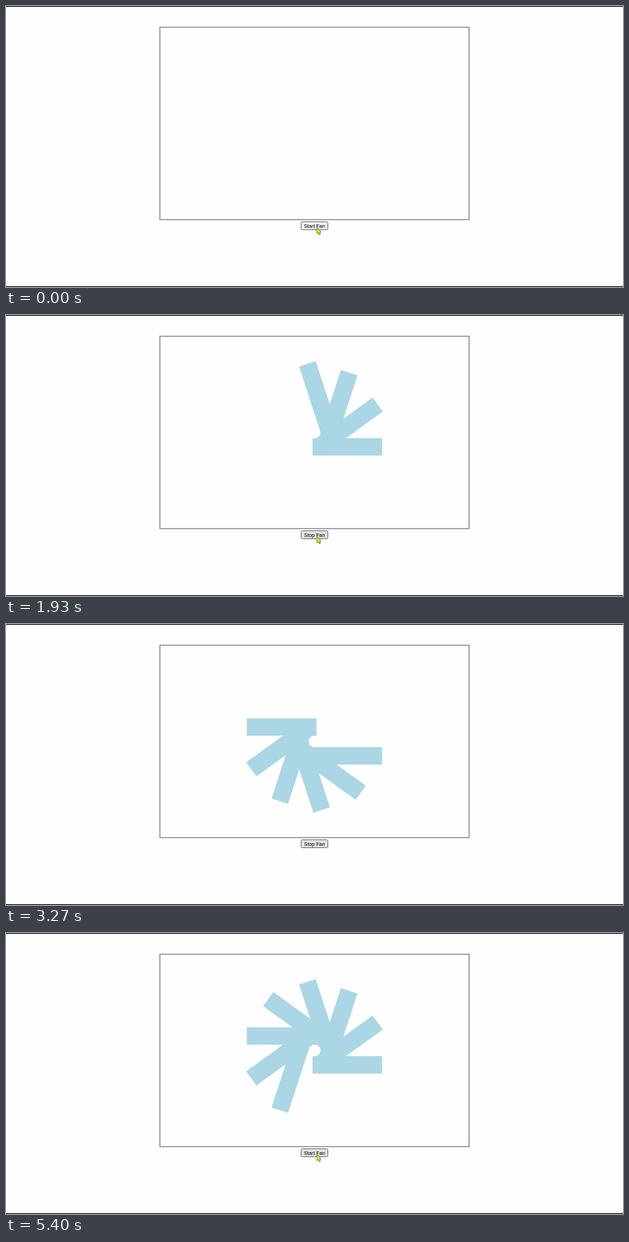
Recreate the animation shown at these times as an HTML page. Size 854x390 px, loop 5.67 s.

```html
<!DOCTYPE html>
<html lang="en">
<head>
<meta charset="utf-8">
<title>Fan</title>
<style>
  html, body { margin: 0; width: 100%; height: 100%; overflow: hidden; background: #fefefe; }
  svg { display: block; width: 854px; height: 390px; }
  text { font: 7.13px "Liberation Sans", Arial, sans-serif; text-anchor: middle; }
</style>
</head>
<body>
<svg viewBox="0 0 854 390">
  <path d="M0 .5H854M0 389.5H854" stroke="#000"/>
  <rect x="213" y="29.5" width="428" height="267" fill="none" stroke="#88888f" stroke-width="1.4"/>
  <g id="fan" transform="translate(427 163)" fill="#abd6e6"></g>
  <rect id="button" x="408.5" y="299.5" width="37" height="11" rx="1.8" stroke="#707070"/>
  <text id="label" x="427" y="307.5"></text>
  <path id="cursor" d="M430.4 306.4V316.2L432.4 314.6L433.7 317.6L435.2 317L434 314H436.2Z"
        fill="#e8ec1c" stroke="#5c5e1c" stroke-width=".7"/>
</svg>
<script>
const LOOP = 5670, FRAME = 200 / 3, BLADES = 10, TICK = 100;
const $ = id => document.getElementById(id);

const blades = Array.from({ length: BLADES }, (_, i) => {
  const blade = document.createElementNS('http://www.w3.org/2000/svg', 'rect');
  const box = { x: -2.67, y: 8, width: 96.3, height: 24.1, transform: `rotate(${i * 360 / BLADES})` };
  for (const key in box) blade.setAttribute(key, box[key]);
  return $('fan').appendChild(blade);
});

const show = (el, on) => el.setAttribute('visibility', on ? 'visible' : 'hidden');
const ticksSince = (t, start) => Math.floor((t - start) / TICK);

// The fan is paused after tick 29 and stopped after tick 40.
const tickAt = t => t < 4290
  ? Math.min(29, ticksSince(t, 510))
  : Math.min(40, 30 + ticksSince(t, 4290));

function draw(time) {
  const t = Math.floor((time % LOOP + 4) / FRAME) * FRAME;
  const tick = tickAt(t);

  // Each pass adds blades one by one; every second pass runs backwards.
  const period = BLADES + 1;
  const step = tick % period;
  const backwards = Math.floor(tick / period) % 2;
  blades.forEach((blade, i) =>
    show(blade, (backwards ? (BLADES - i) % BLADES : i) <= step));

  const running = t > 460 && t < 3520 || t > 4060 && t < 5390;
  $('label').textContent = running ? 'Stop Fan' : 'Start Fan';
  $('button').setAttribute('fill', t > 460 ? '#e4e4e4' : '#f0f0f0');
  show($('cursor'), t < 2590 || t > 3390);
}

const start = performance.now();
function loop() {
  draw(performance.now() - start);
  requestAnimationFrame(loop);
}
loop();
</script>
</body>
</html>
```
